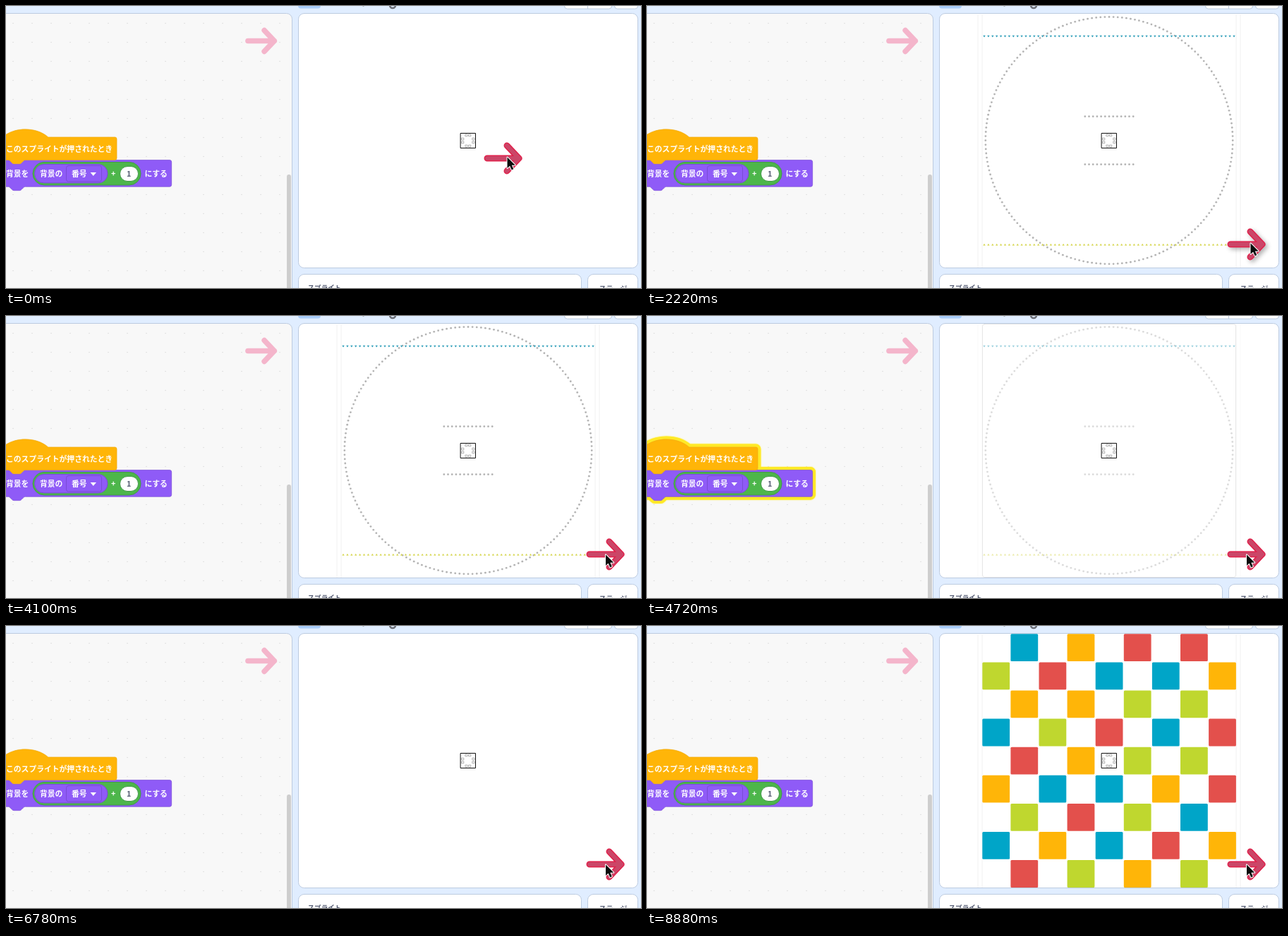
Animation, 900 px wide and 400 px high, one loop 9.46 s. Source, as an HTML page with a canvas:

```html
<!DOCTYPE html>
<html lang="ja">
<head>
<meta charset="utf-8">
<style>
html, body { margin: 0; width: 100%; height: 100%; overflow: hidden; background: #e0edff; }
canvas { display: block; }
</style>
</head>
<body>
<canvas id="view" width="900" height="400"></canvas>
<script>
const ctx = document.getElementById('view').getContext('2d');
const LOOP = 9460;
const U = 0.675; // zoom of the block workspace
const FONT = '"Noto Sans CJK JP", "Noto Sans CJK", "Noto Sans", sans-serif';
const PURPLE = '#8f5bf7', PURPLE_EDGE = '#7a4cd6';
const YELLOW = '#ffb508', GREEN = '#4db64b';

// Each press on the arrow selects the next backdrop.
const CLICKS = [
  [140, 'dots'], [2560, 'frame'], [2960, 'blank'], [3280, 'board'], [3560, 'blank'], [3840, 'dots'],
  [4700, 'frame'], [6240, 'blank'], [6900, 'board'], [7250, 'blank'], [7550, 'dots'],
  [8000, 'frame'], [8330, 'blank'], [8660, 'board']
];
const FADE = 40, GLOW = 80;
const DRAG_START = 160, DRAG_END = 1060, DROP = 2440;

const BOARD = [
  '.B.O.R.R.', 'G.R.B.B.O', '.O.O.G.G.', 'B.G.R.B.R', '.R.O.G.G.',
  'O.B.B.O.R', '.G.R.G.B.', 'B.O.B.R.O', '.R.G.O.G.'
];
const TILE = { B: '#00a5c8', O: '#ffb508', R: '#e3504c', G: '#bfd72f' };

function box(x, y, w, h, r, fill, stroke, width = 1) {
  ctx.beginPath();
  ctx.roundRect(x, y, w, h, r);
  if (fill) { ctx.fillStyle = fill; ctx.fill(); }
  if (stroke) { ctx.strokeStyle = stroke; ctx.lineWidth = width; ctx.stroke(); }
}

function disc(x, y, r, color) {
  ctx.fillStyle = color;
  ctx.beginPath();
  ctx.arc(x, y, r, 0, Math.PI * 2);
  ctx.fill();
}

function poly(points, color) {
  ctx.fillStyle = color;
  ctx.beginPath();
  points.forEach(([x, y]) => ctx.lineTo(x, y));
  ctx.closePath();
  ctx.fill();
}

function label(str, x, y, color = '#fff', size = 10.8) {
  ctx.font = `700 ${size}px ${FONT}`;
  ctx.fillStyle = color;
  ctx.fillText(str, x, y);
}

function arrow(x, y, k, color, width) {
  ctx.strokeStyle = color;
  ctx.lineWidth = width;
  ctx.lineCap = ctx.lineJoin = 'round';
  ctx.beginPath();
  ctx.moveTo(x - 23 * k, y);
  ctx.lineTo(x + 22 * k, y);
  ctx.moveTo(x + 5 * k, y - 18 * k);
  ctx.lineTo(x + 22 * k, y);
  ctx.lineTo(x + 5 * k, y + 18 * k);
  ctx.stroke();
}

// Block outlines, in workspace units from the block's top left corner.
const TAB = 'c-2,0 -3,1 -4,2 l-4,4 c-1,1 -2,2 -4,2 h-12 c-2,0 -3,-1 -4,-2 l-4,-4 c-1,-1 -2,-2 -4,-2';
const NOTCH = 'c2,0 3,1 4,2 l4,4 c1,1 2,2 4,2 h12 c2,0 3,-1 4,-2 l4,-4 c1,-1 2,-2 4,-2';
const HAT = new Path2D(`M0,0 c25,-22 71,-22 96,0 H236 a4,4 0 0 1 4,4 V44
  a4,4 0 0 1 -4,4 H48 ${TAB} H4 a4,4 0 0 1 -4,-4 Z`);
const STACK = new Path2D(`M0,4 a4,4 0 0 1 4,-4 H12 ${NOTCH} H351 a4,4 0 0 1 4,4 V52
  a4,4 0 0 1 -4,4 H48 ${TAB} H4 a4,4 0 0 1 -4,-4 Z`);

function block(path, y, fill, edge, width) {
  ctx.save();
  ctx.translate(-5, y);
  ctx.scale(U, U);
  ctx.lineJoin = 'round';
  ctx.lineWidth = width;
  ctx.strokeStyle = edge;
  ctx.fillStyle = fill;
  ctx.fill(path);
  ctx.stroke(path);
  ctx.restore();
}

function workspace(glowing) {
  box(-20, 10.5, 425.5, 420, 8, '#f8f8f8', '#bccbe0');
  for (let x = 10; x < 398; x += 27)
    for (let y = 24.5; y < 400; y += 27) disc(x, y, 0.8, '#dcdcdc');
  arrow(362, 49.5, 0.83, '#f4b5cb', 7.6);

  if (glowing) {
    ctx.save();
    ctx.shadowColor = '#fff04a';
    ctx.shadowBlur = 2;
    block(HAT, 186, '#ffe926', '#ffe926', 13);
    block(STACK, 218.5, '#ffe926', '#ffe926', 13);
    ctx.restore();
  }
  block(STACK, 218.5, PURPLE, PURPLE_EDGE, 1);
  block(HAT, 186, YELLOW, '#f0aa12', 1);
  label('このスプライトが押されたとき', 0, 206.5);

  label('背景を', 0, 242);
  box(38, 221.5, 153, 32.5, 16.2, GREEN, '#43994a');
  box(40.5, 224.5, 103.5, 26.5, 13.2, PURPLE, PURPLE_EDGE);
  label('背景の', 48, 242);
  box(85.5, 226.5, 50, 22.5, 3, PURPLE, PURPLE_EDGE);
  label('番号', 93, 242);
  poly([[119.5, 236], [128, 236], [123.75, 241]], '#fff');
  label('+', 149, 242);
  box(161.5, 227.5, 26, 21, 10.5, '#fff', '#43994a');
  label('1', 171, 242, '#575e75');
  label('にする', 196.5, 242);

  box(398, 239, 6, 180, 3, '#cecece');
}

function chrome() {
  ctx.fillStyle = '#e0edff';
  ctx.fillRect(0, 0, 900, 400);
  box(414, -20, 32, 23.5, 4, '#a9cdfa');
  ctx.strokeStyle = '#6d7079';
  ctx.lineWidth = 2.5;
  ctx.beginPath();
  ctx.arc(548, -1, 4, 0, Math.PI * 2);
  ctx.stroke();
  disc(506.5, -1, 1.5, '#777');
  box(791.5, -20, 67, 24, 4, '#fff', '#bccbe0');
  ctx.fillStyle = '#bccbe0';
  ctx.fillRect(824, 0, 1, 4);
  box(862.5, -20, 33, 24, 4, '#fff', '#bccbe0');

  box(414.5, 380.5, 401, 60, 8, '#fff', '#bccbe0');
  box(824.5, 380.5, 71, 60, 8, '#fff', '#bccbe0');
  label('スプライト', 427.5, 403, '#575e75', 9.6);
  label('ステージ', 840.5, 405, '#575e75', 10);
}

function sideLines() {
  ctx.fillStyle = '#f1f1f1';
  for (const x of [468.5, 474.5, 834.5, 840.5]) ctx.fillRect(x, 12, 1, 359);
}

const backdrops = {
  blank() {},

  dots() {
    sideLines();
    for (let i = 0; i < 180; i++) {
      const a = i * Math.PI / 90;
      disc(655 + 175.2 * Math.cos(a), 190.7 + 175.2 * Math.sin(a), 1.4, '#b4b4b4');
    }
    for (let i = 0; i < 61; i++) {
      const x = 478 + i * 5.9;
      poly([[x - 1.7, 41.7], [x + 1.7, 41.7], [x, 44.6]], '#2c9db8');
      poly([[x - 1.7, 339.8], [x + 1.7, 339.8], [x, 336.9]], '#d6d650');
    }
    for (let i = 0; i < 13; i++) {
      disc(620.8 + i * 5.7, 156.7, 1.4, '#b4b4b4');
      disc(620.8 + i * 5.7, 224.7, 1.4, '#b4b4b4');
    }
  },

  frame() {
    box(475.5, 11.5, 359, 359, 3, null, '#d2d2d2');
  },

  board() {
    sideLines();
    BOARD.forEach((row, r) => [...row].forEach((c, i) => {
      if (c !== '.') box(475.3 + i * 40.1, 11.3 + r * 40.1, 38.8, 38.8, 1.5, TILE[c]);
    }));
  }
};

function piece() {
  box(644.5, 180.5, 21, 21, 0, '#fff', '#111');
  ctx.strokeStyle = '#a0a0a0';
  ctx.lineWidth = 0.8;
  for (const s of [-1, 1])
    for (const o of [-2.4, 2.4]) {
      ctx.strokeRect(653.6 + o, 189.6 + s * 7.6, 2.8, 2.8);
      ctx.strokeRect(653.6 + s * 7.6, 189.6 + o, 2.8, 2.8);
    }
}

function pointer(x, y) {
  ctx.beginPath();
  for (const [dx, dy] of [[0, 0], [0, 15.5], [3.6, 12.2], [6.2, 18], [8.8, 16.8], [6.3, 11.2], [11.2, 11.2]])
    ctx.lineTo(x + dx, y + dy);
  ctx.closePath();
  ctx.lineJoin = 'round';
  ctx.strokeStyle = '#fff';
  ctx.lineWidth = 2;
  ctx.stroke();
  ctx.fillStyle = '#0a0a0a';
  ctx.fill();
}

const clamp = v => Math.min(1, Math.max(0, v));
const ease = v => v * v * (3 - 2 * v);

function stage(t, current, previous, mix) {
  box(414.5, 10.5, 481, 361, 8, '#fff', '#bccbe0');
  ctx.save();
  ctx.beginPath();
  ctx.roundRect(415, 11, 480, 360, 7.5);
  ctx.clip();
  if (mix < 1) {
    ctx.globalAlpha = 1 - mix;
    backdrops[previous]();
  }
  ctx.globalAlpha = mix;
  backdrops[current]();
  ctx.globalAlpha = 1;
  piece();

  const moved = ease(clamp((t - DRAG_START) / (DRAG_END - DRAG_START)));
  const x = 705 + 145 * moved, y = 216 + 122 * moved;
  ctx.save();
  if (t > DRAG_START && t < DROP) {
    ctx.shadowColor = 'rgba(0,0,0,0.3)';
    ctx.shadowBlur = 6;
    ctx.shadowOffsetX = ctx.shadowOffsetY = 3;
  }
  arrow(x, y, 1, '#e0204a', 9);
  ctx.restore();
  arrow(x, y, 1, '#cb4668', 6);

  const settle = ease(clamp((t - DROP) / 100));
  pointer(x + 5.5 - 5.5 * settle, y - 1.5 + 2 * settle);
  ctx.restore();
}

function draw(t) {
  const last = CLICKS.findLastIndex(([at]) => at <= t);
  const since = last < 0 ? Infinity : t - CLICKS[last][0];
  const current = last < 0 ? 'blank' : CLICKS[last][1];
  const previous = last < 1 ? 'blank' : CLICKS[last - 1][1];
  chrome();
  workspace(since < GLOW);
  stage(t, current, previous, clamp(since / FADE));
}

const start = performance.now();
function tick() {
  draw((performance.now() - start) % LOOP);
  requestAnimationFrame(tick);
}
tick();
</script>
</body>
</html>
```
